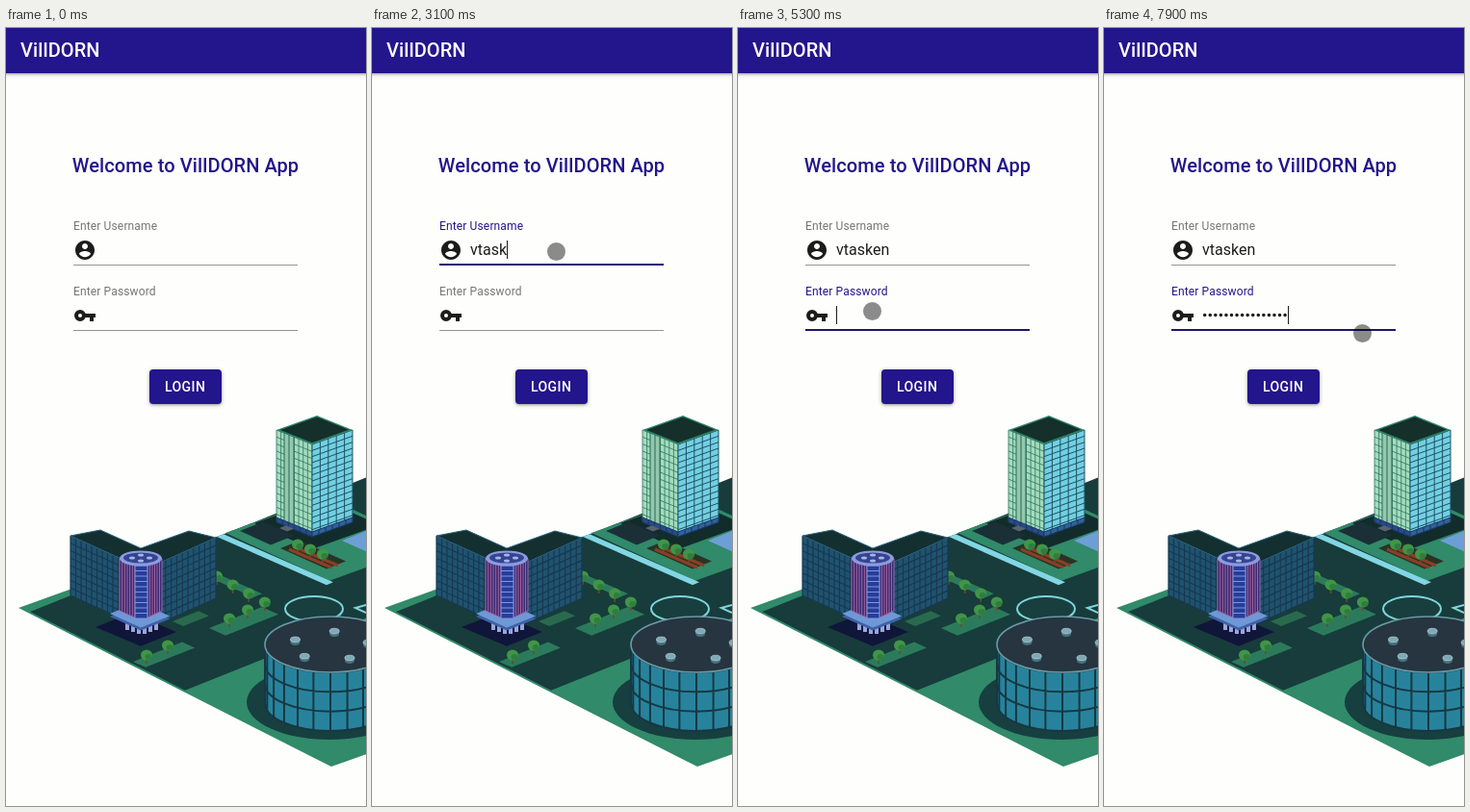
Recreate the animation shown at these times as an HTML page. Size 374x809 px, loop 8 s.

```html
<!DOCTYPE html>
<html lang="en">
<head>
<meta charset="utf-8">
<title>Login</title>
<style>
  html, body { margin: 0; width: 100%; height: 100%; overflow: hidden; background: #fefefd; }
  svg { display: block; width: 100%; height: 100%; font-family: Roboto, sans-serif; }
  .medium { font-weight: 500; letter-spacing: .1px; }
  .label { font-size: 12px; letter-spacing: .14px; }
  .shadow { filter: drop-shadow(0 1px 1px rgba(0, 0, 0, .2)) drop-shadow(0 1px 2px rgba(0, 0, 0, .25)); }
</style>
</head>
<body>
<svg viewBox="0 0 374 809">
  <g id="scene"></g>
  <rect class="shadow" x="-9" y="-9" width="392" height="56" fill="#23158b"/>
  <text class="medium" x="15" y="30" font-size="20" fill="#fff">VillDORN</text>
  <text class="medium" x="186.5" y="150" font-size="20" text-anchor="middle" fill="#23158b">Welcome to VillDORN App</text>

  <text class="label" x="70" y="210">Enter Username</text>
  <text class="label" x="70" y="278">Enter Password</text>
  <path fill="#949494" d="M70 246h233v1h-233zM70 314h233v1h-233z"/>
  <path class="line" fill="#1e1670" d="M-116.5 245h233v2h-233z"/>
  <path class="line" fill="#1e1670" d="M-116.5 313h233v2h-233z"/>
  <g fill="#1c1c1c">
    <path transform="translate(70 219)" d="M12 2C6.48 2 2 6.48 2 12s4.48 10 10 10 10-4.48 10-10S17.52 2 12 2zm0 3c1.66 0 3 1.34 3 3s-1.34 3-3 3-3-1.34-3-3 1.34-3 3-3zm0 14.2c-2.5 0-4.71-1.28-6-3.22.03-1.99 4-3.08 6-3.08 1.99 0 5.97 1.09 6 3.08-1.29 1.94-3.5 3.22-6 3.22z"/>
    <g transform="translate(70 287)">
      <circle cx="7" cy="12" r="4" fill="none" stroke="#1c1c1c" stroke-width="4"/>
      <path d="M12 10h11v4h-2v4h-4v-4h-5z"/>
    </g>
    <text id="user" x="102" y="236" font-size="16"></text>
    <path id="dots"/>
    <rect id="caret" width="1" height="19"/>
  </g>

  <rect class="shadow" x="149" y="355" width="75" height="36" rx="4" fill="#23158b"/>
  <text class="medium" x="165" y="378" font-size="14" style="letter-spacing:.4px" fill="#fff">LOGIN</text>
  <circle id="pointer" r="9.5" fill="#000" fill-opacity=".45"/>
</svg>
<script>
const $ = id => document.getElementById(id);
const repeat = (n, fn) => Array.from({ length: n }, (_, i) => fn(i)).join('');

// ---------- scenery ----------
const path = (d, fill, extra = '') => `<path d="${d}" fill="${fill}" ${extra}/>`;
const stroke = (d, color, width = 1) => path(d, 'none', `stroke="${color}" stroke-width="${width}"`);
const oval = (x, y, rx, ry, fill, extra = '') =>
  `<ellipse cx="${x}" cy="${y}" rx="${rx}" ry="${ry}" fill="${fill}" ${extra}/>`;

// Flat plot: left corner, run down-right, run up-right
const tile = (x, y, a, b, fill, down = .45, up = .4) =>
  path(`M${x} ${y}l${a} ${a * down} ${b} ${-b * up} ${-a} ${-a * down}z`, fill);

// Slanted wall with a window grid
function wall(x, y, dx, dy, h, cols, rows, fill, line, width = 1) {
  const grid = repeat(cols + 1, c => `M${x + dx * c / cols} ${y + dy * c / cols}v${h}`) +
    repeat(rows + 1, r => `M${x} ${y + h * r / rows}l${dx} ${dy}`);
  return path(`M${x} ${y}l${dx} ${dy}v${h}l${-dx} ${-dy}z`, fill) + stroke(grid, line, width);
}

const treeRow = (n, x, y, dx, dy) => repeat(n, i => {
  const tx = x + dx * i, ty = y + dy * i;
  return stroke(`M${tx} ${ty}v9`, '#6b4a2c', 1.5) + oval(tx, ty, 6, 5.5, '#419547') +
    oval(tx + 2, ty + 2, 3.5, 3, '#2f7d40');
});

const ground = () =>
  tile(13, 603, 325, 320, '#318a69', .508, .36) +
  tile(25, 607, 161, 400, '#173c3b', .508, .4) +
  tile(228, 525, 108, 104, '#318a69', .46, .36) +
  tile(219, 529, 114, 7, '#82d6e3', .44) +
  tile(258, 515, 60, 70, '#122c2c', .45, .36) +
  tile(243, 523, 32, 24, '#1a3036') +
  tile(285, 541, 48, 20, '#2a3325') +
  stroke('M294 542l44 19M301 540l44 19', '#8a3f25', 3) +
  tile(349, 533, 30, 30, '#6d9fd6') +
  treeRow(3, 303, 537, 13, 5) +
  tile(215, 573, 42, 9, '#2c7a5c') +
  tile(211, 624, 17, 55, '#2c7a5c') +
  tile(132, 659, 13, 51, '#2c7a5c') +
  tile(173, 617, 11, 27, '#296a4e') +
  treeRow(4, 219, 570, 16.6, 9) +
  treeRow(2, 232, 614, 19, -9) +
  treeRow(2, 146, 652, 22, -10) +
  oval(320, 604, 30, 13, '#183f3e', 'stroke="#7ed6dc" stroke-width="2"') +
  stroke('M374 600l-11 3 11 5', '#7ed6dc', 2);

const tallTower = () =>
  wall(281, 418, 37, 15, 95, 8, 13, '#a1dcbd', '#33735f', .8) +
  wall(318, 433, 42, -15, 95, 5, 15, '#72cfe2', '#1d5263') +
  wall(289, 421, 10, 4, 95, 2, 1, '#92c9ad', '#2d6657') +
  wall(281, 509, 37, 15, 5, 6, 1, '#284b88', '#1b3566') +
  wall(318, 524, 42, -15, 5, 6, 1, '#2f6398', '#1b3566') +
  tile(284, 520, 8, 7, '#59636e') +
  tile(281, 418, 37, 42, '#2c8266', .405, .357) +
  tile(285, 418, 33, 38, '#152f2a', .405, .357);

const office = () =>
  path('M67 528L98 522 140 541 190 523 218 530 160 556 122 553z', '#142f30') +
  wall(67, 528, 55, 25, 62, 10, 8, '#1f5370', '#17384f', 1.2) +
  wall(160, 556, 58, -26, 63, 10, 8, '#1f5370', '#17384f', 1.2) +
  stroke('M122 553L67 528 98 522 140 541 190 523 218 530 160 556', '#2a6680') +
  tile(93, 623, 47, 37, '#10153a', .42) +
  repeat(6, i => stroke(`M${126 + i * 6} ${614 + 2 * Math.min(i, 5 - i)}v12`, '#9ba5da', 4)) +
  tile(108, 612, 32, 30, '#3e62a5') +
  tile(108, 609, 32, 30, '#6f98d6') +
  wall(118, 552, 16, 7, 54, 6, 1, '#3a2a72', '#a3649f') +
  wall(147, 559, 15, -7, 54, 6, 1, '#3a2a72', '#a3649f') +
  wall(134, 559, 13, 0, 55, 1, 10, '#273d9b', '#8298db') +
  oval(140, 551.5, 22, 8, '#8c9be0') +
  oval(140, 551, 18, 5.5, '#35458f') +
  repeat(4, i => oval(140 + 9 * Math.cos(i * Math.PI / 2), 551 + 3 * Math.sin(i * Math.PI / 2), 3, 1.5, '#a7b4ec'));

function rotunda() {
  const cx = 337, cy = 641, rx = 68, ry = 29, h = 61;
  const arc = y => `M${cx - rx} ${y}a${rx} ${ry} 0 0 0 ${2 * rx} 0`;
  const rib = i => `M${cx + rx * Math.cos(Math.PI * i / 12)} ${cy + ry * Math.sin(Math.PI * i / 12)}v${h}`;
  const vent = i => {
    const a = (276 + 72 * i) * Math.PI / 180;
    const x = cx + 40 * Math.cos(a), y = 642 + 15 * Math.sin(a);
    return path(`M${x - 5} ${y}v3a5 3 0 0 0 10 0v-3z`, '#46707f') +
      oval(x, y, 5, 2.8, '#7fa9b5', 'stroke="#b7d2d8" stroke-width=".7"');
  };
  return oval(336, 701, 86, 39, '#173f40') +
    path(`${arc(cy + h)}v${-h}h${-2 * rx}z`, '#27839c') +
    stroke(repeat(13, rib) + repeat(4, i => arc(cy + h * i / 3)), '#163843', 2) +
    oval(cx, cy, rx, ry, '#26353f', 'stroke="#6b9aa8" stroke-width="1.6"') +
    repeat(5, vent);
}

$('scene').innerHTML = ground() + tallTower() + office() + rotunda();

// ---------- motion ----------
const LOOP = 8000, STEP = 100, NAME = 'vtasken', SECRET = 16, PITCH = 5.56;
const entry = { x: 244.5, y: 286.5 };
const moves = [
  { from: 300, to: 600, x: 191.5, y: 232.5 },
  { from: 4500, to: 4700, x: 143.5, y: 273.5 },
  { from: 4800, to: 5000, x: 139.5, y: 294.5 },
  { from: 6200, to: 6400, x: 301, y: 305 },
  { from: 7400, to: 7900, x: 268.5, y: 317.5 },
];
const labels = document.querySelectorAll('.label');
const lines = document.querySelectorAll('.line');

const ramp = (t, from, to) => Math.min(1, Math.max(0, (t - from) / (to - from)));
const within = (t, a, b) => t >= a && t < b;

const pointerAt = t => moves.reduce((p, m) => {
  const k = ramp(t, m.from, m.to);
  return { x: p.x + (m.x - p.x) * k, y: p.y + (m.y - p.y) * k };
}, entry);

const nameCount = t => Math.floor(NAME.length * ramp(t, 1725, 3650));
// Fast at first, then slower
const secretCount = t => Math.round(SECRET * (1 - (1 - ramp(t, 5600, 7800)) ** 1.45));

function setFocus(i, k) {
  const mix = (a, b) => Math.round(a + (b - a) * k);
  labels[i].setAttribute('fill', `rgb(${mix(117, 35)},${mix(117, 21)},${mix(117, 139)})`);
  lines[i].setAttribute('transform', `translate(186.5 0) scale(${.5 + k / 2} 1)`);
  lines[i].setAttribute('opacity', k);
}

function draw(now) {
  const t = Math.floor(now % LOOP / STEP) * STEP;
  const onPass = t >= 5200, n = secretCount(t);
  const swap = ramp(t, 5100, 5300);

  setFocus(0, ramp(t, 900, 1100) - swap);
  setFocus(1, swap);

  const user = $('user');
  user.textContent = NAME.slice(0, nameCount(t));
  $('dots').setAttribute('d',
    repeat(n, i => `M${102.9 + i * PITCH} 298.5a1.8 1.8 0 1 0 3.6 0a1.8 1.8 0 1 0 -3.6 0`));

  const caret = $('caret');
  const width = onPass ? n * PITCH : user.textContent ? user.getComputedTextLength() : 0;
  const hidden = t < 1000 || within(t, 1400, 1900) || within(t, 4200, 4700);
  caret.setAttribute('x', Math.round(102 + width));
  caret.setAttribute('y', onPass ? 289 : 221);
  caret.setAttribute('visibility', hidden ? 'hidden' : 'visible');

  const pointer = $('pointer'), p = pointerAt(t);
  pointer.setAttribute('cx', p.x);
  pointer.setAttribute('cy', p.y);
  pointer.setAttribute('visibility', t < 300 ? 'hidden' : 'visible');
}

let start;
function tick(now) {
  start ??= now;
  draw(now - start);
  requestAnimationFrame(tick);
}
draw(0);
requestAnimationFrame(tick);
</script>
</body>
</html>
```
